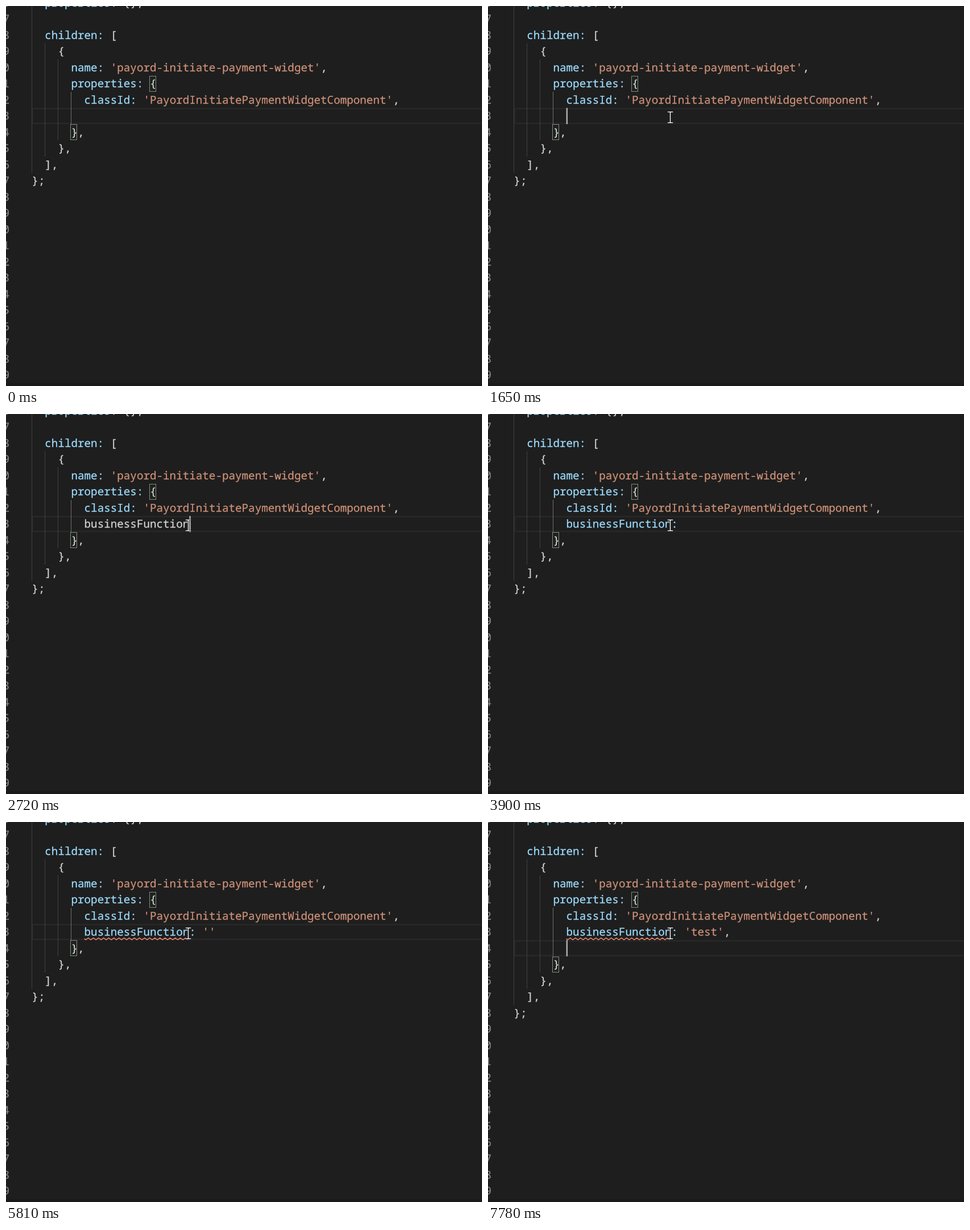
Recreate the animation shown at these times as an HTML page. Size 837x669 px, loop 8000 ms.

```html
<!DOCTYPE html>
<html lang="en">
<head>
<meta charset="utf-8">
<title>Code editor</title>
<style>
  html, body { margin: 0; width: 100%; height: 100%; overflow: hidden; background: #1e1e1e; }
  svg { display: block; width: 837px; height: 669px; }
  text {
    font: 19.243px "Noto Sans Mono", monospace; white-space: pre;
    text-rendering: geometricPrecision; stroke-width: .25px;
  }
</style>
</head>
<body>
<svg id="stage" viewBox="0 0 837 669"></svg>
<script>
const LOOP = 8000, CHAR = 11.546, LINE = 28.5, LEFT = 45.2, TOP = 37;
const PLAIN = '#d4d4d4', KEY = '#9cdcfe', STR = '#ce9178';
const PROP = 'businessFunction';
const OPTIONS = [PROP, 'creditorAccountType', 'currencies', 'enableBankBranchCode',
  'enableCreditorAccountType', 'label', 'maxOccurs', 'minOccurs',
  'output.editPaymentCompleted', 'paymentOrderCreatedEventName', 'paymentType', 'privilege'];

// [time, text after the property name (null: no name yet), caret column (-1: hidden)]
const EDITS = [
  [0, null, -1], [1650, null, 0], [2170, null, -1], [2620, null, 0],
  [2720, '', 16], [3180, '', -1], [3430, ':', 17], [3900, ':', -1], [4340, ':', 17],
  [4460, ': ', 18], [4640, ": ''", 19], [4860, ": ''", 20], [5340, ": ''", 19],
  [5810, ": ''", -1], [6080, ": 't'", 20], [6350, ": 'te'", 21], [6610, ": 'tes'", 22],
  [6800, ": 'test'", 23], [7090, ": 'test'", 24], [7560, ": 'test'", -1],
  [7630, ": 'test',", 25], [7780, ": 'test',", 0]
];

// Mouse path: [time, x, y]
const PATH = [
  [220, 695, 652], [420, 565, 490], [600, 375, 255], [740, 268, 152], [830, 257, 144],
  [930, 275, 183], [990, 297, 184], [1090, 299, 186], [1250, 307, 205],
  [1400, 317, 203], [1500, 320.5, 196]
];

const colX = col => LEFT + col * CHAR;
const rowY = row => TOP + row * LINE;
const rect = (x, y, w, h, fill, more = '') =>
  `<rect x="${x}" y="${y}" width="${w}" height="${h}" fill="${fill}" ${more}/>`;
const label = (x, y, str, fill) => `<text x="${x}" y="${y}" fill="${fill}" stroke="${fill}">${str}</text>`;
const path = (d, stroke, width, more = '') =>
  `<path d="${d}" fill="none" stroke="${stroke}" stroke-width="${width}" ${more}/>`;
const code = (col, row, str, fill = PLAIN) => label(colX(col), rowY(row) + 20.7, str, fill);
const guide = (col, from, to, fill = '#404040') =>
  rect(Math.floor(colX(col)), rowY(from), 1, (to - from) * LINE, fill);
const bracketBox = (col, row) =>
  rect(Math.floor(colX(col)) - 0.5, Math.round(rowY(row)) + 0.5, 11, 27, '#1c231c', 'stroke="#888"');

function editor(t, value, caret) {
  const extra = t >= 7780 ? 1 : 0, active = 5 + extra;
  let s = rect(0, 664, 837, 5, '#1a1a1a');
  s += rect(46.5, rowY(active) + 1.2, 800, 26, 'none', 'stroke="#282828" stroke-width="2.5"');
  for (let row = -2; row < 22; row++) s += label(-5.5, rowY(row) + 20.7, (row + 18) % 10, '#858585');

  s += guide(0, -2, 9 + extra) + guide(2, 1, 8 + extra) + guide(4, 2, 7 + extra)
    + guide(6, 4, 6 + extra, '#707070') + bracketBox(18, 3) + bracketBox(6, 6 + extra);

  s += code(2, -2, 'properties:', KEY) + code(14, -2, '{},')
    + code(2, 0, 'children:', KEY) + code(12, 0, '[') + code(4, 1, '{')
    + code(6, 2, 'name:', KEY) + code(12, 2, "'payord-initiate-payment-widget'", STR) + code(44, 2, ',')
    + code(6, 3, 'properties:', KEY) + code(18, 3, '{')
    + code(8, 4, 'classId:', KEY) + code(17, 4, "'PayordInitiatePaymentWidgetComponent'", STR) + code(55, 4, ',');
  ['},', '},', '],', '};'].forEach((str, i) => { s += code(6 - 2 * i, 6 + i + extra, str); });

  if (value !== null) {
    s += code(8, 5, PROP + value.slice(0, 1), t < 2780 ? PLAIN : KEY);
    s += code(26, 5, value.slice(2).replace(',', ''), STR);
    if (value.endsWith(',')) s += code(32, 5, ',');
  }
  if (t >= 4080) s += path(`M${colX(8)} 205.4l2.6 1.9` + 'l4.5 -3.1l4.5 3.1'.repeat(20), '#f48771', 1.4);
  if (t >= 2040 && t < 2720) s += popup();
  if (caret >= 0) s += rect(colX(8 + caret), rowY(active), 2.5, LINE, '#aeafad');
  return s;
}

function popup() {
  let s = rect(138.5, 208.5, 643, 340, '#252526', 'stroke="#454545"') + rect(139, 208.5, 642, LINE, '#062f4a');
  OPTIONS.forEach((name, i) => {
    const y = 223 + i * LINE;
    s += label(172, y + 6.9, name, PLAIN);
    s += path('M1.5 6L9 2.4L14.5 5.2V10.2L7 13.6L1.5 10.9ZL7 8.8V13.6M7 8.8L14.5 5.2', '#75beff', 1,
      `stroke-linejoin="round" transform="translate(141.7 ${y - 12}) scale(1.5)"`);
  });
  return s;
}

function mouse(t) {
  if (t < PATH[0][0]) return '';
  const next = PATH.findIndex(p => p[0] > t);
  let [, x, y] = PATH[PATH.length - 1];
  if (next > 0) {
    const [t0, x0, y0] = PATH[next - 1], [t1, x1, y1] = PATH[next];
    const k = (t - t0) / (t1 - t0);
    x = x0 + (x1 - x0) * k;
    y = y0 + (y1 - y0) * k;
  }
  const beam = 'M-4.7 -9.5H4.7M0 -9.5V9.5M-4.7 9.5H4.7';
  return `<g transform="translate(${x} ${y})">${path(beam, '#000', 3)}${path(beam, '#fff', 1.5)}</g>`;
}

const stage = document.getElementById('stage');
const start = performance.now();
let shown = '';

function draw() {
  const t = (performance.now() - start) % LOOP;
  const [, value, caret] = EDITS.findLast(e => e[0] <= t);
  const scene = editor(t, value, caret) + mouse(t);
  if (scene !== shown) stage.innerHTML = shown = scene;
  requestAnimationFrame(draw);
}
draw();
</script>
</body>
</html>
```
